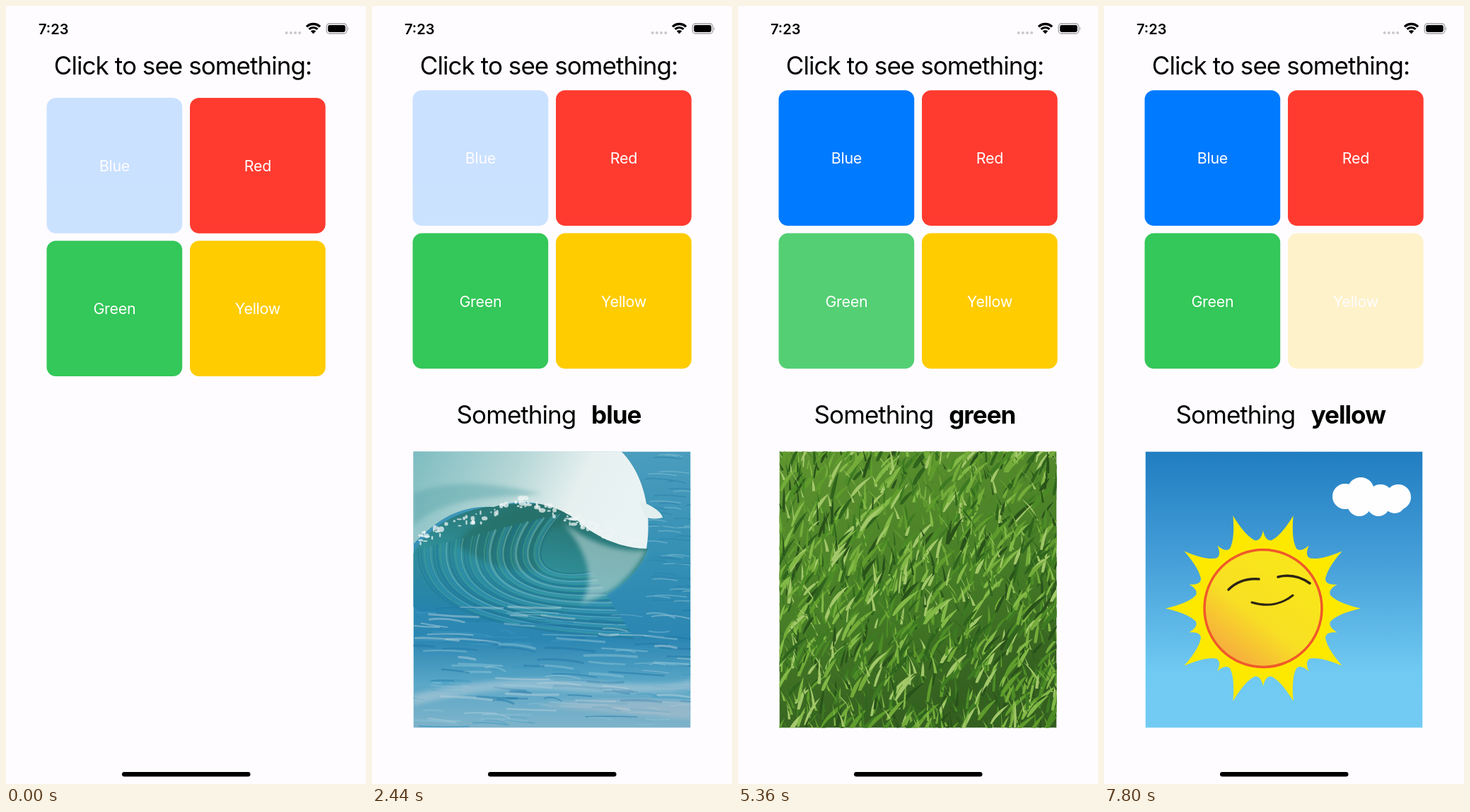
These frames come from a looping animation (509x1101 px, 8 s). An HTML page:

```html
<!DOCTYPE html>
<html lang="en">
<head>
<meta charset="utf-8">
<title>Click to see something</title>
<style>
html, body { margin: 0; width: 100%; height: 100%; overflow: hidden; background: #fefcff; }
svg { display: block; width: 100%; height: 100%; }
text { font-family: Inter, "Liberation Sans", sans-serif; font-optical-sizing: none; }
.big { font-size: 35px; letter-spacing: -.027em; text-anchor: middle; }
.label { font-size: 21.4px; letter-spacing: -.012em; text-anchor: middle; fill: #fff; }
.clock { font-size: 20px; font-weight: 600; }
</style>
</head>
<body>
<svg id="stage" viewBox="0 0 509 1101">
  <defs>
    <clipPath id="frame"><rect x="58.5" y="630.5" width="392" height="391"/></clipPath>
    <filter id="soft" x="-10%" y="-10%" width="120%" height="120%"><feGaussianBlur stdDeviation="3"/></filter>
    <linearGradient id="sky" x2="0" y2="1">
      <stop offset="0" stop-color="#217dc1"/><stop offset=".4" stop-color="#469fd8"/>
      <stop offset=".8" stop-color="#70caf2"/><stop offset="1" stop-color="#72cbf3"/>
    </linearGradient>
    <linearGradient id="face" x1=".75" y1=".3" x2=".2" y2="1">
      <stop offset="0" stop-color="#f9e51c"/><stop offset=".45" stop-color="#f8df24"/>
      <stop offset="1" stop-color="#f5a443"/>
    </linearGradient>
    <linearGradient id="sea" x2="0" y2="1">
      <stop offset="0" stop-color="#4b9dbd"/><stop offset=".4" stop-color="#338fb4"/>
      <stop offset=".68" stop-color="#2b86b2"/><stop offset=".84" stop-color="#5aa7c7"/>
      <stop offset="1" stop-color="#7fb3ca"/>
    </linearGradient>
    <linearGradient id="tube" x1=".2" y1="1" x2=".6" y2="0">
      <stop offset="0" stop-color="#2582ae"/><stop offset=".5" stop-color="#2f8e98"/>
      <stop offset="1" stop-color="#276f69"/>
    </linearGradient>
    <linearGradient id="foam" x2="1" y2=".2">
      <stop offset="0" stop-color="#7dbcc0"/><stop offset=".45" stop-color="#b5d6d6"/>
      <stop offset=".75" stop-color="#e6f0ef"/><stop offset="1" stop-color="#eaf3f4"/>
    </linearGradient>
    <linearGradient id="lawn" x2=".3" y2="1">
      <stop offset="0" stop-color="#5f9430"/><stop offset=".6" stop-color="#467c26"/>
      <stop offset="1" stop-color="#345f20"/>
    </linearGradient>
    <linearGradient id="paint" x2=".3" y2="1">
      <stop offset="0" stop-color="#cf3632"/><stop offset=".6" stop-color="#be2a28"/>
      <stop offset="1" stop-color="#a32224"/>
    </linearGradient>
    <linearGradient id="chrome" x2="0" y2="1">
      <stop offset="0" stop-color="#d9dae2"/><stop offset="1" stop-color="#9397ab"/>
    </linearGradient>
  </defs>
  <rect width="509" height="1101" fill="#fefcff"/>
  <text class="clock" x="46" y="39.5">7:23</text>
  <g id="status"></g>
  <text class="big" x="250" y="97">Click to see something:</text>
  <g id="tiles"></g>
  <g id="caption">
    <text id="lead" class="big" y="590.5">Something</text>
    <text id="word" class="big" x="345.3" y="590.5" font-weight="700"></text>
  </g>
  <g id="pictures"></g>
  <rect x="164" y="1084" width="181.500" height="6.500" rx="3.250"/>
</svg>
<script>
const byId = id => document.getElementById(id);
const repeat = (n, make) => Array.from({ length: n }, (_, i) => make(i)).join('');

function seeded(seed) {
  return () => {
    seed = (seed + 0x6D2B79F5) | 0;
    let v = Math.imul(seed ^ (seed >>> 15), seed | 1);
    v ^= v + Math.imul(v ^ (v >>> 7), v | 61);
    return ((v ^ (v >>> 14)) >>> 0) / 4294967296;
  };
}

const fill = (d, color, extra = '') => `<path d="${d}" fill="${color}" ${extra}/>`;
const line = (d, color, width, extra = '') =>
  `<path d="${d}" fill="none" stroke="${color}" stroke-width="${width}" stroke-linecap="round" ${extra}/>`;
const oval = (x, y, rx, ry, color, extra = '') =>
  `<ellipse cx="${x}" cy="${y}" rx="${rx}" ry="${ry}" fill="${color}" ${extra}/>`;
const backdrop = color =>
  `<rect x="58.5" y="630.5" width="392" height="391" fill="${color}"/>`;

function drawStatus() {
  const arc = (r, w) => {
    const k = r * Math.SQRT1_2;
    return `<path d="M${434.5 - k} ${39 - k}A${r} ${r} 0 0 1 ${434.5 + k} ${39 - k}" fill="none" stroke="#000" stroke-width="${w}"/>`;
  };
  return repeat(4, i => oval(396.6 + i * 6.2, 38, 2, 2, '#c9c8cc')) +
    arc(13.5, 3.3) + arc(8.5, 3.2) + fill('M434.500 39.500L430.800 35.600A5.400 5.400 0 0 1 438.200 35.600Z', '#000') +
    '<rect x="453.200" y="25" width="28.600" height="14" rx="4" fill="none" stroke="#a09fa3" stroke-width="1.300"/>' +
    '<rect x="455.200" y="27" width="24.600" height="10" rx="2.400"/>' +
    fill('M483.300 29.800Q485.500 32 483.300 34.500Z', '#a09fa3');
}

function drawWave() {
  const rnd = seeded(12);
  const streaks = repeat(46, i => {
    const s = i / 45;
    const color = ['#1f6f85', '#6fb9c2', '#2c93b4', '#3f9f9d', '#1d7598'][i % 5];
    return line(`M${270 - 205 * s} ${718 + 52 * s}C${215 - 150 * s} ${775 + 75 * s} ` +
      `${235 - 80 * s} ${815 + 70 * s} ${310 + 60 * s} ${800 + 95 * s}`, color, 1 + rnd() * 2.5, 'opacity=".55"');
  });
  const ripples = repeat(150, i => {
    const deep = rnd();
    const y = 850 + deep * 170, x = 50 + rnd() * 390, w = 20 + rnd() * 60;
    const color = ['#2177a5', '#8cc3d8', '#3c97bf', '#b3cfdb'][i % 4];
    return line(`M${x} ${y}q${w / 2} ${rnd() * 8 - 4} ${w} ${rnd() * 6}`, color, 1 + rnd() * 2.5, 'opacity=".5"');
  });
  const offshore = repeat(45, i => {
    const x = 385 + rnd() * 60, y = 635 + rnd() * 210;
    return line(`M${x} ${y}q15 -2 ${20 + rnd() * 25} 2`, ['#2a80a8', '#7fbdd0'][i % 2], 1.5, 'opacity=".6"');
  });
  const spray = repeat(110, () => {
    const s = rnd();
    const x = 60 + s * 320;
    const y = s < .5 ? 757 - 110 * s : 702 + (s - .5) * 126;
    return oval(x, y + rnd() * 16 - 9, 1 + rnd() * 4, 1 + rnd() * 3, '#eef5f4', 'opacity=".75"');
  });
  return backdrop('url(#sea)') + offshore +
    fill('M58 775C95 710 175 700 255 705C310 722 345 757 390 768C380 800 350 828 300 848C210 880 100 880 58 850Z', 'url(#tube)') +
    fill('M120 760C165 705 235 700 285 735C245 728 225 760 240 800C190 800 150 790 120 760Z', '#276f66', 'opacity=".7" filter="url(#soft)"') +
    streaks +
    fill('M268 730C300 755 345 775 388 770C370 805 335 838 295 845C320 810 300 765 268 730Z', '#c5dcda', 'opacity=".55" filter="url(#soft)"') +
    ripples +
    fill('M58 975Q170 945 300 955T452 952V968Q350 975 260 968T58 990Z', '#c0d2dc', 'opacity=".5" filter="url(#soft)"') +
    fill('M230 990Q340 975 452 985V1010Q340 1000 230 990Z', '#b8c2cc', 'opacity=".5" filter="url(#soft)"') +
    fill('M58 630H352C378 655 398 705 388 768C360 768 325 756 300 736C265 704 215 694 172 709C130 706 95 722 58 762Z', 'url(#foam)') +
    fill('M58 690C120 665 190 680 240 690C180 698 110 690 58 735Z', '#5aa5aa', 'opacity=".45" filter="url(#soft)"') +
    fill('M378 700Q408 712 411 724Q395 728 385 722Z', '#e3efee') + spray;
}

function drawCar() {
  const dark = '#282b38';
  const lamp = (x, y, rx, ry) => oval(x, y, rx, ry, '#f1eee9', 'stroke="#8d6a62"') +
    oval(x, y, rx * .78, ry * .8, '#e3b544') + oval(x, y, rx * .5, ry * .55, '#f6e9b9');
  const wheel = (x, y, rx, ry) => oval(x, y, rx, ry, '#f4f3f5') +
    oval(x - 1, y, rx * .68, ry * .7, '#8e91a0') + oval(x - 2, y - 1, rx * .48, ry * .5, '#c3c4ce');
  const bars = repeat(15, i => {
    const u = i / 14, x = 281 + 139 * u;
    const top = 883 - 36 * Math.sin(Math.PI * Math.min(.96, .08 + u * .82));
    return line(`M${x} ${top}L${x + 1} ${888 - 16 * u}`, dark, 2.6);
  });
  return fill('M318 910L402 896Q398 922 380 926Q345 932 327 923Z', dark) +
    fill('M100 746Q133 743 166 749L238 749Q245 762 256 778L213 790L110 779Z', '#aaa3a5') +
    line('M222 774Q240 768 250 777', '#c4bcbc', 6) +
    fill('M80 854Q79 800 80 765Q84 750 102 746Q109 757 112 776L165 777Q192 780 216 786Q290 772 372 780C405 788 428 825 433 858L432 880Q340 902 235 897L187 890L82 866Z', 'url(#paint)') +
    fill('M80 765Q84 750 102 746Q109 757 111 778Q95 790 88 820L80 830Z', '#b02527') +
    line('M88 848Q92 792 108 788Q137 794 146 850', '#7f171c', 1.6) +
    line('M167 777V888M180 876C177 815 184 787 204 783C238 790 262 835 268 888', '#861a1e', 1.6) +
    line('M268 780Q330 802 348 843M338 778Q364 800 368 840', '#8e1c20', 1.2) +
    line('M224 788Q285 782 365 784', '#df5b50', 2, 'opacity=".5"') +
    line('M118 782L126 783', '#d9d5d8', 4) +
    fill('M91 853Q100 838 114 845Q128 855 133 878L160 886V898Q151 910 126 910Q102 906 96 889Z', dark) +
    wheel(105, 881, 12, 24) +
    fill('M80 854L92 858V871L82 865Z', '#b8bac6') +
    fill('M186 872Q188 849 205 850Q226 857 233 892L270 910Q267 935 252 943Q229 949 211 945Q191 935 187 910Z', dark) +
    wheel(204, 904, 17, 31) +
    fill('M226 888Q250 893 273 891L425 871L433 863V886Q360 910 273 911Q232 908 226 888Z', 'url(#chrome)') +
    fill('M272 891Q286 850 336 846Q404 837 428 873Q350 887 272 891Z', '#eceaf0', `stroke="${dark}" stroke-width="3"`) + bars +
    lamp(284, 837, 20, 18) + lamp(408, 830, 12, 17) + lamp(277, 865, 6, 5.5) + lamp(424, 853, 3, 4) +
    fill('M236 869L257 876L260 884L239 881Z', '#edc462') +
    fill('M346 885L371 882L369 898L344 901Z', '#f2f0f2', `stroke="${dark}" stroke-width="1.5"`) +
    fill('M349 831Q357 835 364 831L360 840Q356 844 352 839Z', '#e4dde0') +
    line('M210 780V739Q211 725 226 725L327 729Q339 729 344 738L371 777', '#9d9492', 11) +
    line('M210 780V739Q211 725 226 725L327 729Q339 729 344 738L371 777', '#bcb3b0', 7) +
    line('M183 768L207 779M386 765L372 777', '#b3aaa8', 6) +
    oval(181, 760, 12, 13, '#a79e9d') + oval(183, 760, 8, 9, '#c0b7b5') +
    oval(387, 757, 12, 13, '#a79e9d') + oval(388, 757, 8, 9, '#c2b9b7');
}

function drawGrass() {
  const rnd = seeded(77);
  const tones = ['#29521a', '#5f9c2c', '#3d7a22', '#83b947', '#4c8c26', '#2f641d', '#74ac3a', '#a3c86a'];
  const blades = repeat(40, layer => {
    const d = repeat(38, () => {
      const x = 50 + rnd() * 410, y = 632 + rnd() * 408;
      const long = 14 + rnd() * 26, lean = (rnd() * 1.9 - .75) * long, w = 1.5 + rnd() * 3;
      return `M${x.toFixed(1)} ${y.toFixed(1)}q${(lean * .2).toFixed(1)} ${(-long * .6).toFixed(1)} ` +
        `${lean.toFixed(1)} ${(-long).toFixed(1)}q${(-lean * .5 + w).toFixed(1)} ${(long * .4).toFixed(1)} ` +
        `${(w - lean).toFixed(1)} ${long.toFixed(1)}z`;
    });
    return fill(d, tones[layer % tones.length]);
  });
  return backdrop('url(#lawn)') + blades;
}

function drawSun() {
  const at = (deg, r) => {
    const a = deg * Math.PI / 180;
    return `${(225 + r * Math.cos(a)).toFixed(1)} ${(852.5 + r * Math.sin(a)).toFixed(1)}`;
  };
  const rays = repeat(10, i => {
    const a = i * 36;
    return `${i ? 'L' : 'M'}${at(a, 138)}Q${at(a + 4, 106)} ${at(a + 11, 97)}Q${at(a + 16, 95)} ${at(a + 18, 110)}` +
      `Q${at(a + 20, 95)} ${at(a + 25, 97)}Q${at(a + 32, 106)} ${at(a + 36, 138)}`;
  });
  const puffs = [[341, 694, 18], [363, 686, 19], [391, 695, 18], [416, 695, 18], [361, 705, 17], [388, 706, 16], [411, 703, 15]];
  return backdrop('url(#sky)') +
    puffs.map(([x, y, r]) => oval(x, y, r, r, '#fefefe')).join('') +
    fill(rays + 'Z', '#fde900') +
    oval(225, 852.5, 83, 83, 'url(#face)', 'stroke="#f0592a" stroke-width="3.5"') +
    line('M176 826Q193 809 219 811', '#2c2416', 3.4) +
    line('M246 808Q270 802 291 817', '#2c2416', 3.4) +
    line('M209 844Q242 854 267 834', '#2c2416', 3);
}

const tiles = [
  { name: 'Blue', color: '#007aff', x: 57.5, row: 0, leadX: 204, draw: drawWave },
  { name: 'Red', color: '#ff3b30', x: 260, row: 0, leadX: 213.5, draw: drawCar },
  { name: 'Green', color: '#34c759', x: 57.5, row: 1, leadX: 192, draw: drawGrass },
  { name: 'Yellow', color: '#ffcc00', x: 260, row: 1, leadX: 186, draw: drawSun }
];

byId('status').innerHTML = drawStatus();
byId('tiles').innerHTML = tiles.map(t => {
  const y = t.row * 202.3;
  return `<g><rect x="${t.x}" y="${y}" width="191.7" height="191.7" rx="13" fill="${t.color}"/>` +
    `<text class="label" x="${t.x + 95.9}" y="${y + 104}">${t.name}</text></g>`;
}).join('');
byId('pictures').innerHTML = tiles.map(t => `<g clip-path="url(#frame)">${t.draw()}</g>`).join('');

const buttons = [...byId('tiles').children];
const pictures = [...byId('pictures').children];

const LOOP = 8000, FADE = 270, PRESSED = .2;
// tile, press time, release time
const taps = [
  [0, 0, 651], [0, 2400, 2480], [2, 4140, 4295],
  [2, 5000, 5168], [1, 6480, 6608], [3, 7650, 7790]
];

const stepStart = n => 240 * n + 40 * Math.floor((n + 4) / 10);

// The picture holds between steps.
function holdTime(t) {
  let n = 0;
  while (stepStart(n + 1) <= t) n++;
  return stepStart(n);
}

function update(now) {
  const t = holdTime(now % LOOP);
  const opacity = [1, 1, 1, 1];
  let shown = -1;
  for (const [tile, press, release] of taps) {
    if (t < press) break;
    const p = Math.min(1, Math.max(0, (t - release) / FADE));
    opacity[tile] = PRESSED + (1 - PRESSED) * p * p * (3 - 2 * p);
    if (t >= release) shown = tile;
  }
  buttons.forEach((b, i) => b.setAttribute('opacity', opacity[i]));
  pictures.forEach((p, i) => p.setAttribute('display', i === shown ? 'inline' : 'none'));
  byId('tiles').setAttribute('transform', `translate(0 ${shown < 0 ? 130 : 119.3})`);
  byId('caption').setAttribute('display', shown < 0 ? 'none' : 'inline');
  if (shown >= 0) {
    byId('lead').setAttribute('x', tiles[shown].leadX);
    byId('word').textContent = tiles[shown].name.toLowerCase();
  }
}

let origin;
function tick(now) {
  origin ??= now;
  update(now - origin);
  requestAnimationFrame(tick);
}
update(0);
requestAnimationFrame(tick);
</script>
</body>
</html>
```
